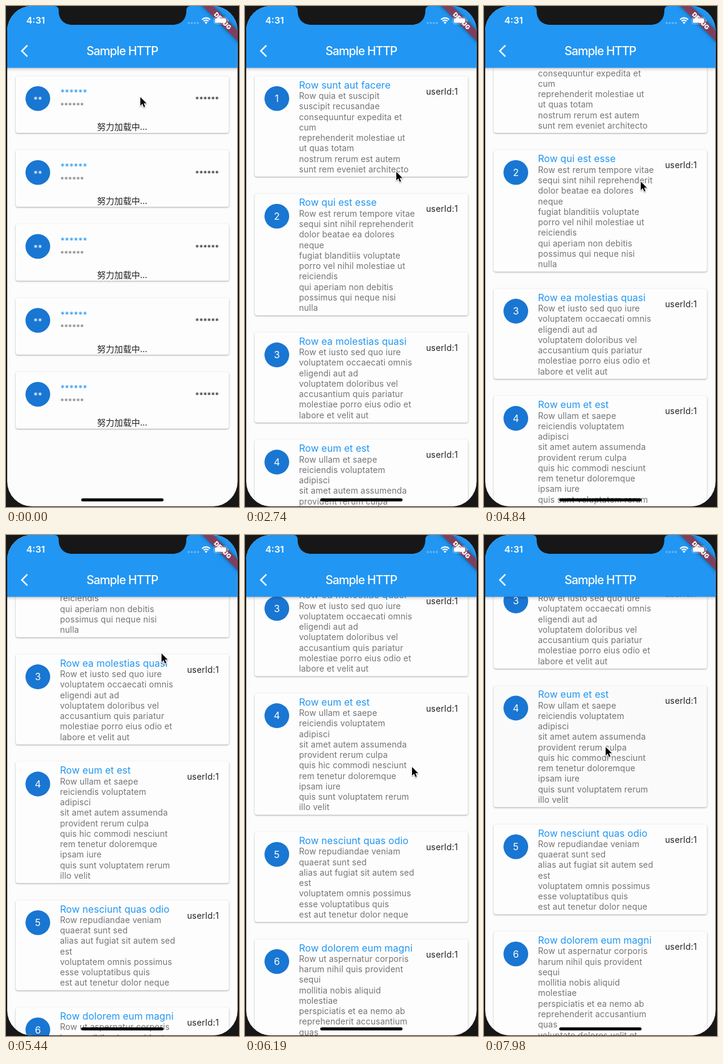
Animation of 385 by 825 pixels, one loop 8 s. Source, as an HTML page with a canvas:

```html
<!DOCTYPE html>
<html lang="en">
<head>
<meta charset="utf-8">
<title>Sample HTTP</title>
<style>
  html, body { margin: 0; width: 100%; height: 100%; overflow: hidden; background: #171717; }
  canvas { display: block; width: 385px; height: 825px; }
</style>
</head>
<body>
<canvas id="stage" width="385" height="825"></canvas>
<script>
const ctx = document.getElementById('stage').getContext('2d');
const LOOP = 8000, LOADED = 2740;
const BLUE = '#2196f3', AVATAR = '#1976d2', BEZEL = '#171717';
const GREY = 'rgba(0,0,0,.54)', INK = 'rgba(0,0,0,.87)';
const SANS = 'Inter, Roboto, sans-serif';
const CJK = '"Noto Sans CJK SC", "Noto Sans CJK", sans-serif';
const LINE = 17.26, GAP = 27.7, TOP = 115;

const rows = [
  ['Row sunt aut facere', 'Row quia et suscipit|suscipit recusandae|consequuntur expedita et|cum|reprehenderit molestiae ut|ut quas totam|nostrum rerum est autem|sunt rem eveniet architecto'],
  ['Row qui est esse', 'Row est rerum tempore vitae|sequi sint nihil reprehenderit|dolor beatae ea dolores|neque|fugiat blanditiis voluptate|porro vel nihil molestiae ut|reiciendis|qui aperiam non debitis|possimus qui neque nisi|nulla'],
  ['Row ea molestias quasi', 'Row et iusto sed quo iure|voluptatem occaecati omnis|eligendi aut ad|voluptatem doloribus vel|accusantium quis pariatur|molestiae porro eius odio et|labore et velit aut'],
  ['Row eum et est', 'Row ullam et saepe|reiciendis voluptatem|adipisci|sit amet autem assumenda|provident rerum culpa|quis hic commodi nesciunt|rem tenetur doloremque|ipsam iure|quis sunt voluptatem rerum|illo velit'],
  ['Row nesciunt quas odio', 'Row repudiandae veniam|quaerat sunt sed|alias aut fugiat sit autem sed|est|voluptatem omnis possimus|esse voluptatibus quis|est aut tenetur dolor neque'],
  ['Row dolorem eum magni', 'Row ut aspernatur corporis|harum nihil quis provident|sequi|mollitia nobis aliquid|molestiae|perspiciatis et ea nemo ab|reprehenderit accusantium|quas|voluptate dolores velit et|doloremque molestiae']
].map(([title, body]) => ({ title, lines: body.split('|') }));

let next = TOP;
for (const row of rows) {
  row.top = next;
  row.height = 28 + LINE * row.lines.length;
  next += row.height + GAP;
}

// Screen refreshes: time, pointer x, pointer y
const steps = [
  [0, 222, 150], [500, 234, 225], [650, 250, 273], [2740, 250, 273],
  [3790, 257, 404], [3940, 257, 427], [4540, 257, 411], [4690, 258, 364],
  [4840, 259, 289], [4990, 258, 231], [5140, 257, 197], [5290, 257, 196],
  [5440, 257, 195], [5590, 252, 222], [5740, 242, 273], [5890, 249, 322],
  [6040, 264, 360], [6190, 276, 382], [6340, 284, 379], [6490, 288, 376],
  [7540, 261, 380], [7680, 202, 352], [7830, 201, 350], [7980, 201, 349]
];

// Short drag, then a fling under friction until a touch stops it
function scrollAt(t) {
  if (t < 4840) return 0;
  if (t < 4990) return 72;
  if (t >= 6490) return 466;
  return 482.6 - 141.6 * Math.exp((5440 - t) * 0.00211);
}

function text(s, x, y, font, color, spacing = 0, align = 'left') {
  ctx.font = font;
  ctx.fillStyle = color;
  ctx.letterSpacing = spacing + 'px';
  ctx.textAlign = align;
  ctx.fillText(s, x, y);
}

function stars(n, x, cy, pitch, size, color) {
  ctx.font = `${size}px ${SANS}`;
  ctx.letterSpacing = '0px';
  const m = ctx.measureText('*');
  const base = cy + (m.actualBoundingBoxAscent - m.actualBoundingBoxDescent) / 2;
  for (let i = 0; i < n; i++) text('*', x + i * pitch, base, ctx.font, color, 0, 'center');
}

function box(x, y, w, h, r, color) {
  ctx.fillStyle = color;
  ctx.beginPath();
  ctx.roundRect(x, y, w, h, r);
  ctx.fill();
}

function disc(x, y, r, color) {
  ctx.fillStyle = color;
  ctx.beginPath();
  ctx.arc(x, y, r, 0, Math.PI * 2);
  ctx.fill();
}

function card(y, h, color) {
  ctx.save();
  ctx.shadowColor = 'rgba(0,0,0,.34)';
  ctx.shadowBlur = 2.5;
  ctx.shadowOffsetY = 1;
  box(16, y + 0.5, 352.5, h - 0.5, 4, color);
  ctx.restore();
  disc(52.6, y + 37.4, 20.4, AVATAR);
}

function loadingList() {
  for (let i = 0; i < 5; i++) {
    const y = TOP + i * 121.75;
    card(y, 94, '#fdfdfd');
    stars(2, 48.9, y + 37, 7.4, 14, '#fff');
    stars(6, 93.4, y + 25.3, 7.4, 14, BLUE);
    stars(6, 92.9, y + 47, 6.55, 12.5, GREY);
    stars(6, 316, y + 37, 6.55, 12.5, INK);
    text('努力加载中...', 192, y + 89.3, `14.2px ${CJK}`, INK, 0, 'center');
  }
}

function rowList(t) {
  const scroll = scrollAt(t);
  rows.forEach((row, i) => {
    const y = row.top - scroll;
    if (y > 825 || y + row.height < 95) return;
    card(y, row.height, i === 3 && t >= 6490 ? '#fafafa' : '#fdfdfd');
    text(String(i + 1), 52.6, y + 43.2, `16px ${SANS}`, '#fff', 0, 'center');
    text(row.title, 89.2, y + 20.7, `15.9px ${SANS}`, BLUE, 0.1);
    row.lines.forEach((line, n) =>
      text(line, 89.2, y + 38 + n * LINE, `13.8px ${SANS}`, GREY, 0.15));
    text('userId:1', 299.2, y + 30.6, `13.9px ${SANS}`, INK, 0.2);
  });
}

function appBar() {
  const shade = ctx.createLinearGradient(0, 101, 0, 108);
  shade.addColorStop(0, 'rgba(0,0,0,.28)');
  shade.addColorStop(0.4, 'rgba(0,0,0,.09)');
  shade.addColorStop(1, 'rgba(0,0,0,0)');
  ctx.fillStyle = shade;
  ctx.fillRect(0, 101, 385, 7);
  ctx.fillStyle = BLUE;
  ctx.fillRect(0, 0, 385, 101.7);
  ctx.save();
  ctx.translate(24.4, 74);
  ctx.fillStyle = '#fff';
  ctx.fill(new Path2D('M11.8 -8.2L10 -10L0 0L10 10L11.8 8.2L3.6 0Z'));
  ctx.restore();
  text('Sample HTTP', 133, 81, `500 19.5px ${SANS}`, '#fff', -0.8);
}

function ribbon() {
  ctx.save();
  ctx.translate(382.5, 0);
  ctx.rotate(Math.PI / 4);
  ctx.save();
  ctx.shadowColor = 'rgba(0,0,0,.5)';
  ctx.shadowBlur = 6;
  ctx.fillStyle = '#7f3f5c';
  ctx.fillRect(-60, 28.5, 120, 12.2);
  ctx.restore();
  text('DEBUG', 0, 38.3, `900 10.2px ${SANS}`, '#fff', 0, 'center');
  ctx.restore();
}

function statusBar() {
  text('4:31', 33.5, 29.2, `600 15.2px ${SANS}`, '#fff');
  for (let i = 0; i < 4; i++) disc(302 + i * 5, 28, 1.8, 'rgba(255,255,255,.32)');
  ctx.strokeStyle = '#fff';
  ctx.lineWidth = 2.2;
  for (const r of [5.6, 9.3]) {
    ctx.beginPath();
    ctx.arc(330.6, 29, r, -Math.PI * 0.75, -Math.PI * 0.25);
    ctx.stroke();
  }
  ctx.fillStyle = '#fff';
  ctx.beginPath();
  ctx.moveTo(330.6, 29.6);
  ctx.arc(330.6, 29.6, 3.4, -Math.PI * 0.75, -Math.PI * 0.25);
  ctx.fill();
  ctx.strokeStyle = 'rgba(255,255,255,.45)';
  ctx.lineWidth = 1;
  ctx.beginPath();
  ctx.roundRect(343.5, 18.5, 22, 11, 3);
  ctx.stroke();
  box(345.2, 20.2, 18.6, 7.6, 1.6, '#fff');
  box(366.5, 22, 1.5, 4, 1, 'rgba(255,255,255,.5)');
}

function notch() {
  ctx.fillStyle = BEZEL;
  ctx.beginPath();
  ctx.moveTo(80, 0);
  ctx.quadraticCurveTo(87, 0, 87, 8);
  ctx.bezierCurveTo(87, 22, 96, 31, 110, 31);
  ctx.lineTo(275, 31);
  ctx.bezierCurveTo(289, 31, 298, 22, 298, 8);
  ctx.quadraticCurveTo(298, 0, 305, 0);
  ctx.fill();
}

function pointer(x, y) {
  ctx.save();
  ctx.translate(x, y);
  const arrow = new Path2D('M0 0V14.2L3.3 11.1L5.7 16.6L7.9 15.7L5.6 10.3H10.2Z');
  ctx.lineJoin = 'round';
  ctx.strokeStyle = '#fff';
  ctx.lineWidth = 2;
  ctx.shadowColor = 'rgba(0,0,0,.35)';
  ctx.shadowBlur = 2;
  ctx.shadowOffsetY = 1;
  ctx.stroke(arrow);
  ctx.shadowColor = 'transparent';
  ctx.fillStyle = '#000';
  ctx.fill(arrow);
  ctx.restore();
}

function draw(time) {
  const [t, x, y] = steps.findLast(step => step[0] <= time);
  ctx.fillStyle = BEZEL;
  ctx.fillRect(0, 0, 385, 825);
  ctx.save();
  ctx.beginPath();
  ctx.roundRect(2, 0, 380.7, 824, 41);
  ctx.clip();
  ctx.fillStyle = '#fcfcfc';
  ctx.fillRect(0, 0, 385, 825);
  if (t < LOADED) loadingList();
  else rowList(t);
  appBar();
  ribbon();
  statusBar();
  notch();
  box(124.3, 810.7, 136, 5, 2.5, '#000');
  ctx.restore();
  pointer(x, y);
}

const start = performance.now();
function tick() {
  draw((performance.now() - start) % LOOP);
  requestAnimationFrame(tick);
}
tick();
</script>
</body>
</html>
```
